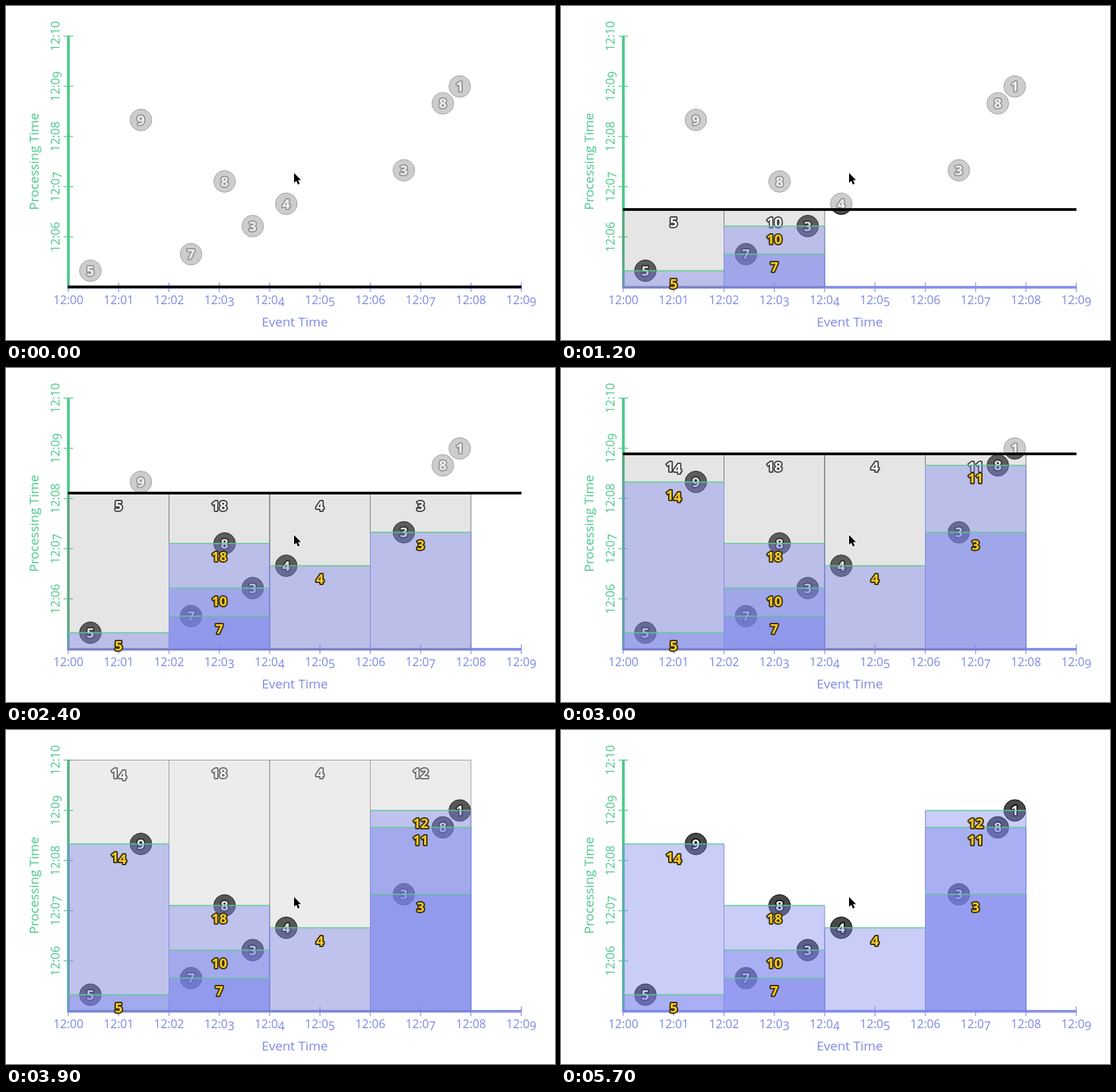
Recreate the animation shown at these times as an HTML page. Size 810x494 px, loop 6000 ms.

```html
<!DOCTYPE html>
<html lang="en">
<head>
<meta charset="utf-8">
<title>Event time and processing time</title>
<style>
  html, body { margin: 0; width: 100%; height: 100%; overflow: hidden; background: #fff; }
  svg { display: block; width: 810px; height: 494px; }
  text { font-family: "Open Sans", sans-serif; text-anchor: middle; }
  .title { font-size: 19px; }
  .tick { font-size: 17.5px; }
  .value { font-size: 20px; font-weight: 700; stroke-width: 4; stroke-linejoin: round; paint-order: stroke; }
  .blue { fill: #7d8ae6; }
  .green { fill: #4cc98a; }
  .waiting circle { fill: #cdcdcd; stroke: #a0a0a0; }
  .waiting text { fill: #f0f0f0; stroke: #9a9a9a; }
  .seen circle { fill: #484848; stroke: #000; }
  .seen text { fill: #fff; stroke: #111; }
  .state { fill: #999; fill-opacity: .25; stroke: #777; }
  .running { fill: #fff; stroke: #444; }
  .pane { fill: rgb(120, 130, 234); fill-opacity: .4; }
  .side { fill: none; stroke: #7d88e0; }
  .level { stroke: #5fca90; stroke-width: 1.3; }
  .emitted { fill: #fc2; stroke: #3a3010; }
</style>
</head>
<body>
<svg id="stage" viewBox="0 0 810 494">
  <defs>
    <clipPath id="above"><rect id="aboveRect" width="810" height="0"/></clipPath>
    <clipPath id="below"><rect id="belowRect" width="810" height="494"/></clipPath>
  </defs>
</svg>
<script>
const LOOP = 6000, LEFT = 92, RIGHT = 760, TOP = 44.5, BASE = 416, MINUTE = 74.25;
const START = 417, SPEED = 58 / 600, FADE_START = 3840, FADE_TIME = 240, LABEL_DROP = 19;
const $ = id => document.getElementById(id);
const stage = $('stage');

// x, y, value, window, running sum of the window
const events = [
  [124.5, 391.5, 5, 0, 5], [273, 367, 7, 1, 7], [364, 325.5, 3, 1, 10],
  [413.5, 292.5, 4, 2, 4], [322.5, 259.5, 8, 1, 18], [587, 243, 3, 3, 3],
  [199, 168.5, 9, 0, 14], [644.5, 144, 8, 3, 11], [669.5, 119, 1, 3, 12]
].map(([x, y, value, win, sum]) => ({ x, y, value, win, sum }));

function add(parent, tag, attrs = {}) {
  const node = document.createElementNS('http://www.w3.org/2000/svg', tag);
  for (const key in attrs) node.setAttribute(key, attrs[key]);
  return parent.appendChild(node);
}
const layer = (attrs) => add(stage, 'g', attrs);
const line = (parent, x1, y1, x2, y2, attrs) => add(parent, 'line', { x1, y1, x2, y2, ...attrs });

// Text whose low digits hang under the baseline, as old-style figures do
function figures(parent, string, attrs) {
  const node = add(parent, 'text', attrs);
  let last = 0;
  for (const char of String(string)) {
    const drop = String(string).length > 1 && '34579'.includes(char) ? 3 : 0;
    add(node, 'tspan', { dy: drop - last }).textContent = char;
    last = drop;
  }
  return node;
}
const valueText = (parent, string, x, y, kind = '') =>
  figures(parent, string, { x, y: y + 7, class: 'value ' + kind });
const show = (node, on) => { node.style.display = on ? '' : 'none'; };
const windowLeft = i => LEFT + 2 * MINUTE * i;
const windowMiddle = i => windowLeft(i) + MINUTE;

// Axes
const axes = layer();
line(axes, LEFT, TOP - .5, LEFT, BASE + 2, { stroke: '#4fcb8b', 'stroke-width': 4 });
line(axes, LEFT - 2, BASE, RIGHT + .5, BASE, { stroke: '#8791e8', 'stroke-width': 4 });
for (let i = 0; i < 10; i++) {
  const x = LEFT + MINUTE * i;
  line(axes, x, BASE - 7, x, BASE + 7, { stroke: '#8791e8', 'stroke-width': 1.3 });
  figures(axes, '12:0' + i, { x, y: 441, class: 'tick blue' });
}
['12:10', '12:09', '12:08', '12:07', '12:06'].forEach((label, i) => {
  const y = TOP + MINUTE * i;
  line(axes, LEFT - 7, y, LEFT + 7, y, { stroke: '#4fcb8b', 'stroke-width': 1.3 });
  figures(axes, label, { transform: `translate(79 ${y}) rotate(-90)`, class: 'tick green' });
});
add(axes, 'text', { x: 426, y: 474, class: 'title blue' }).textContent = 'Event Time';
add(axes, 'text', { transform: 'translate(48 230) rotate(-90)', class: 'title green' })
  .textContent = 'Processing Time';

// Events, split at the moving line
for (const [kind, clip] of [['waiting', 'above'], ['seen', 'below']]) {
  const group = layer({ class: kind, 'clip-path': `url(#${clip})` });
  for (const e of events) {
    add(group, 'circle', { cx: e.x, cy: e.y, r: 16 });
    valueText(group, e.value, e.x, e.y);
  }
}

// Accumulating state of each window
const stateLayer = layer();
const states = [0, 1, 2, 3].map(i => ({
  first: events.find(e => e.win === i).y,
  rect: add(stateLayer, 'rect', { x: windowLeft(i), width: 2 * MINUTE, class: 'state' })
}));
const runningLayer = layer();
for (const e of events) e.running = valueText(runningLayer, e.sum, windowMiddle(e.win), 0, 'running');

// Emitted results
const paneLayer = layer(), levelLayer = layer(), emittedLayer = layer();
for (const e of events) {
  const x = windowLeft(e.win), end = x + 2 * MINUTE;
  const pane = add(paneLayer, 'g');
  add(pane, 'rect', { x, y: e.y, width: 2 * MINUTE, height: BASE - e.y, class: 'pane' });
  add(pane, 'path', { d: `M${x} ${BASE}V${e.y}M${end} ${e.y}V${BASE}`, class: 'side' });
  e.parts = [
    pane,
    line(levelLayer, x, e.y, end, e.y, { class: 'level' }),
    valueText(emittedLayer, e.sum, windowMiddle(e.win), e.y + LABEL_DROP, 'emitted')
  ];
  e.next = events.find(other => other.win === e.win && other.y < e.y);
}

const now = line(stage, LEFT - .5, 0, RIGHT + .5, 0, { stroke: '#000', 'stroke-width': 4 });
add(stage, 'path', {
  d: 'M425 247v14.5l3.3-3 2.4 5.6 2.6-1.1-2.4-5.5h4.4z',
  stroke: '#fff', 'stroke-width': 2, 'paint-order': 'stroke'
});

function draw(t) {
  const y = Math.max(TOP, Math.min(415.5, START - SPEED * t));
  const reached = level => y <= level + .5;
  const opacity = Math.max(0, Math.min(1, 1 - (t - FADE_START) / FADE_TIME));

  $('aboveRect').setAttribute('height', y);
  $('belowRect').setAttribute('y', y);
  now.setAttribute('transform', `translate(0 ${y})`);
  show(now, y > TOP);
  stateLayer.style.opacity = runningLayer.style.opacity = opacity;

  for (const s of states) {
    show(s.rect, reached(s.first));
    s.rect.setAttribute('y', y);
    s.rect.setAttribute('height', BASE - y);
  }
  for (const e of events) {
    const on = reached(e.y);
    e.parts.forEach(part => show(part, on));
    show(e.running, on && !(e.next && reached(e.next.y)));
    e.running.setAttribute('transform', `translate(0 ${y + LABEL_DROP - 7 + 7})`);
  }
}

const begin = performance.now();
function tick() {
  draw((performance.now() - begin) % LOOP);
  requestAnimationFrame(tick);
}
tick();
</script>
</body>
</html>
```
